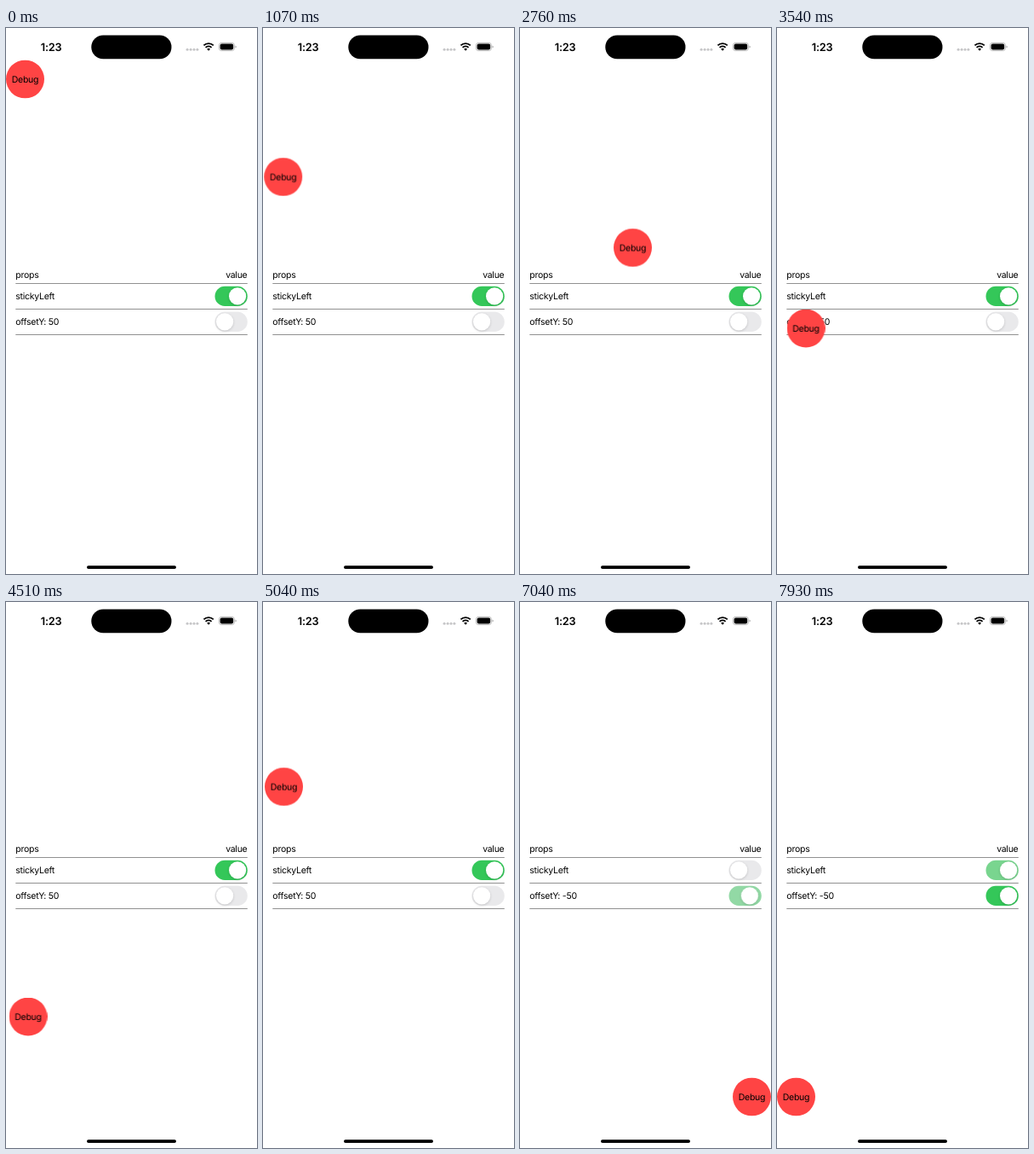
These frames come from a looping animation (295x640 px, 8000 ms). An HTML page:

```html
<!DOCTYPE html>
<html lang="en">
<head>
<meta charset="utf-8">
<title>Draggable debug button</title>
<style>
html, body { margin: 0; width: 100%; height: 100%; overflow: hidden; background: #fff; }
svg { display: block; width: 295px; height: 640px; }
text { font: 10.5px Inter, "Liberation Sans", sans-serif; letter-spacing: -.25px; text-rendering: geometricPrecision; }
.clock { font-size: 12.75px; font-weight: 600; letter-spacing: -.2px; }
.end { text-anchor: end; }
.mid { text-anchor: middle; }
.rule { stroke: #858585; stroke-width: .9; }
.track { fill: #e9e9eb; }
.knob { fill: #fff; filter: drop-shadow(0 1.5px 1.5px rgba(0, 0, 0, .16)); }

.ball, .track, .knob, .plus, .minus { animation: 8s linear infinite; }
.ball { animation-name: drag; animation-timing-function: step-end; }
.plus { animation-name: plus; animation-timing-function: step-end; }
.minus { animation-name: minus; animation-timing-function: step-end; }
.sticky .track { animation-name: sticky-track; }
.sticky .knob { animation-name: sticky-knob; }
.offset .track { animation-name: offset-track; }
.offset .knob { animation-name: offset-knob; }

@keyframes drag {
  0% { transform: translate(0, 37.5px); }
  /* loop out and back to the left edge */
  6.25% { transform: translate(14px, 50px); }
  7.625% { transform: translate(110px, 110px); }
  9.125% { transform: translate(208px, 200px); }
  10.5% { transform: translate(170px, 259px); }
  11.875% { transform: translate(60px, 175px); }
  13.375% { transform: translate(1.2px, 152px); }
  /* across to the right edge */
  19.75% { transform: translate(8px, 150px); }
  21.125% { transform: translate(60px, 135px); }
  22.5% { transform: translate(150px, 115px); }
  24% { transform: translate(215px, 104px); }
  25.375% { transform: translate(241.7px, 102.3px); }
  /* down to the left */
  31.375% { transform: translate(236px, 112px); }
  32.75% { transform: translate(190px, 170px); }
  34.125% { transform: translate(110px, 235px); }
  35.625% { transform: translate(45px, 282px); }
  37% { transform: translate(17px, 299.5px); }
  /* arc further down */
  44.25% { transform: translate(11.5px, 329.5px); }
  45.75% { transform: translate(60px, 390px); }
  47.125% { transform: translate(90px, 440px); }
  48.625% { transform: translate(35px, 470px); }
  50% { transform: translate(2px, 473.5px); }
  /* arc back up */
  56.375% { transform: translate(3.5px, 463.5px); }
  57.875% { transform: translate(70px, 390px); }
  59.125% { transform: translate(143px, 300px); }
  60.375% { transform: translate(120px, 230px); }
  61.75% { transform: translate(30px, 197px); }
  63% { transform: translate(2px, 194px); }
  /* corners chosen by the switches */
  72.75% { transform: translate(250px, 37.5px); }
  86.75% { transform: translate(250px, 557.5px); }
  97.75%, 100% { transform: translate(0, 557.5px); }
}
@keyframes plus { 0% { opacity: 1; } 86.75%, 100% { opacity: 0; } }
@keyframes minus { 0% { opacity: 0; } 86.75%, 100% { opacity: 1; } }

@keyframes sticky-track {
  0%, 71.4% { fill: #34c759; }
  76%, 96.25% { fill: #e9e9eb; }
  99.125%, 100% { fill: #79d58f; }
}
@keyframes sticky-knob {
  0%, 71.4% { transform: translateX(15px); }
  75%, 96.25% { transform: none; }
  98.9%, 100% { transform: translateX(15px); }
}
@keyframes offset-track {
  0%, 85.25% { fill: #e9e9eb; }
  91%, 100% { fill: #34c759; }
}
@keyframes offset-knob {
  0%, 85.25% { transform: none; }
  88.5%, 100% { transform: translateX(15px); }
}
</style>
</head>
<body>
<svg viewBox="0 0 295 640">
  <!-- status bar -->
  <text class="clock" x="40.7" y="26.6">1:23</text>
  <rect x="100.3" y="8.5" width="94.2" height="27.8" rx="13.9"/>
  <g fill="#c6c6c8">
    <circle cx="213.1" cy="25.2" r="1.5"/>
    <circle cx="217.1" cy="25.2" r="1.5"/>
    <circle cx="221" cy="25.2" r="1.5"/>
    <circle cx="224.9" cy="25.2" r="1.5"/>
  </g>
  <g fill="none" stroke="#000" stroke-width="1.8">
    <path d="M232.4 20.4a8.2 8.2 0 0 1 11.4 0"/>
    <path d="M234.6 22.9a5 5 0 0 1 7 0"/>
  </g>
  <path d="M238.1 26.7l-1.9-2a2.8 2.8 0 0 1 3.8 0z"/>
  <rect x="250.4" y="17.4" width="18" height="9.2" rx="2.9" fill="none" stroke="#a8a8a8" stroke-width=".8"/>
  <rect x="251.6" y="18.6" width="15.6" height="6.8" rx="1.8"/>
  <path d="M269.5 20.5q1.3.5 1.3 1.5t-1.3 1.5z" fill="#a8a8a8"/>

  <!-- property table -->
  <text x="11.3" y="293.2">props</text>
  <text class="end" x="283.5" y="293.2">value</text>
  <text x="11.3" y="318">stickyLeft</text>
  <text class="plus" x="11.3" y="348">offsetY: 50</text>
  <text class="minus" x="11.3" y="348">offsetY: -50</text>
  <path class="rule" d="M11.3 299.5H283.8M11.3 329.5H283.8M11.3 359.5H283.8"/>
  <g class="sticky">
    <rect class="track" x="245.5" y="302.8" width="38.3" height="23.2" rx="11.6"/>
    <circle class="knob" cx="257.1" cy="314.4" r="10.1"/>
  </g>
  <g class="offset">
    <rect class="track" x="245.5" y="332.8" width="38.3" height="23.2" rx="11.6"/>
    <circle class="knob" cx="257.1" cy="344.4" r="10.1"/>
  </g>

  <rect x="95" y="630.2" width="105" height="3.8" rx="1.9"/>

  <g class="ball">
    <circle cx="22.5" cy="22.5" r="22.5" fill="#ff4444"/>
    <text class="mid" x="22.5" y="26.2">Debug</text>
  </g>
</svg>
</body>
</html>
```
